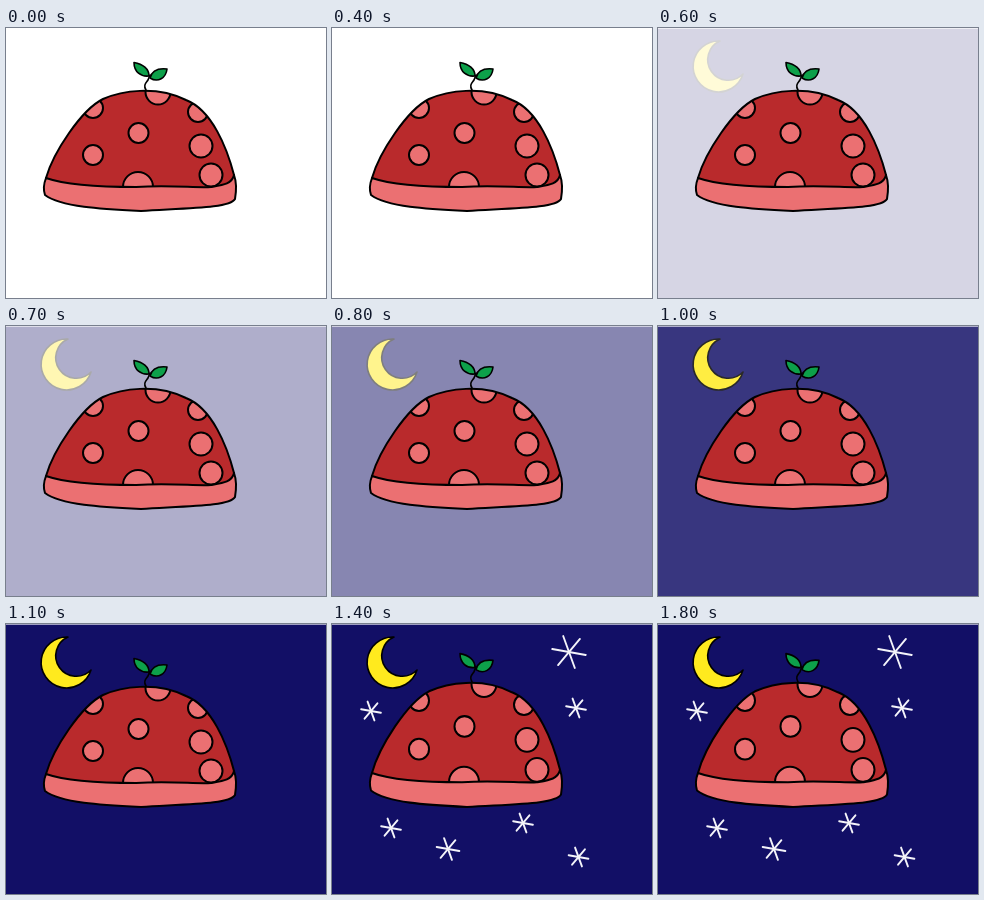
An HTML page that plays this animation: 320 by 270 pixels, repeating every 2000 ms.

```html
<!DOCTYPE html>
<html lang="en">
<head>
<meta charset="utf-8">
<title>Strawberry hat at night</title>
<style>
  html, body { margin: 0; width: 100%; height: 100%; overflow: hidden; background: #fff; }
  svg { display: block; width: 320px; height: 270px; }
  .ink { stroke: #000; stroke-width: 2; stroke-linejoin: round; stroke-linecap: round; }
  .thin { stroke-width: 1.6; }
  .stars { stroke: #f4f4fa; stroke-width: 1.9; stroke-linecap: round; }
</style>
</head>
<body>
<svg viewBox="0 0 320 270">
  <defs>
    <path id="dome" d="M40 150C47 125 75 82 97 71C115 63 150 57 180 72C206 82 221 120 228 147V165H40Z"/>
    <clipPath id="inside"><use href="#dome"/></clipPath>
  </defs>

  <g id="night">
    <rect y=".6" width="320" height="270" fill="#120f66"/>
    <path class="ink thin" fill="#ffea1e" d="M62 13A25.500 25.500 0 1 0 85 46A20.500 20.500 0 1 1 62 13Z"/>
  </g>
  <g id="scattered" class="stars"></g>
  <g id="ring" class="stars"></g>

  <g id="hat">
    <use href="#dome" fill="#b92a2c"/>
    <g id="spots" class="ink" fill="#eb7072" clip-path="url(#inside)"></g>
    <use href="#dome" class="ink" fill="none"/>
    <path class="ink" fill="#eb7072" d="M40 150C60 157 95 159 130 159C165 157 190 160 205 159C217 157 226 156 228 147C231 155 230 165 229 171C224 180 185 180 135 183C95 181 55 179 39 167C37 161 38 155 40 150Z"/>
    <g class="ink thin">
      <path fill="none" d="M140 62C137 57 140 55 142 52L144 47"/>
      <path fill="#0da04a" d="M143 48C135 49 128 44 128 34.500C137 36 143 41 143 48Z"/>
      <path fill="#0da04a" d="M144 50C146 42 152 40 161 41C160 50 152 55 144 50Z"/>
    </g>
  </g>
</svg>
<script>
  const $ = id => document.getElementById(id);
  const range = n => [...Array(n).keys()];

  const spot = ([x, y, r = 10]) => `<circle cx="${x}" cy="${y}" r="${r}"/>`;
  $('spots').innerHTML = [
    [87, 127], [132.5, 105], [195, 118, 11.5], [205, 147, 11.5],
    [132, 159, 15], [152, 64, 12.5], [87, 80], [192, 84]
  ].map(spot).join('');

  // Three crossed strokes, 60 degrees apart
  const star = ([x, y, r = 10]) => range(3).map(i =>
    `<path d="M${-r} 0H${r}" transform="translate(${x} ${y}) rotate(${10 + i * 60})"/>`).join('');

  $('scattered').innerHTML = [
    [237, 28, 17], [39, 87], [244, 84], [59, 204], [116, 225, 11.5], [191, 199], [246.5, 233]
  ].map(star).join('');

  // Arc around the hat, leaving the moon's corner free
  $('ring').innerHTML = range(6).map(i => {
    const a = (-60 + i * 48) * Math.PI / 180;
    return star([140 + 123 * Math.cos(a), 128 + 100 * Math.sin(a)]);
  }).join('');

  const show = (id, on) => $(id).setAttribute('visibility', on ? 'visible' : 'hidden');

  function draw() {
    const t = performance.now() % 2000;
    const starry = t >= 1200;
    const fading = t >= 600 && !starry;
    const beat = Math.floor(t / 200) % 2 === 1;

    // Night falls in six equal steps
    const dark = Math.floor((t - 500) / 100) / 6;
    $('night').setAttribute('opacity', Math.max(0, Math.min(1, dark)));

    // The hat stretches up from its brim on every other beat, but rests at nightfall
    const stretch = beat && !fading ? 1.033 : 1;
    $('hat').setAttribute('transform', `translate(0 183) scale(1 ${stretch}) translate(0 -183)`);

    show('scattered', starry && beat);
    show('ring', starry && !beat);
    requestAnimationFrame(draw);
  }
  draw();
</script>
</body>
</html>
```
